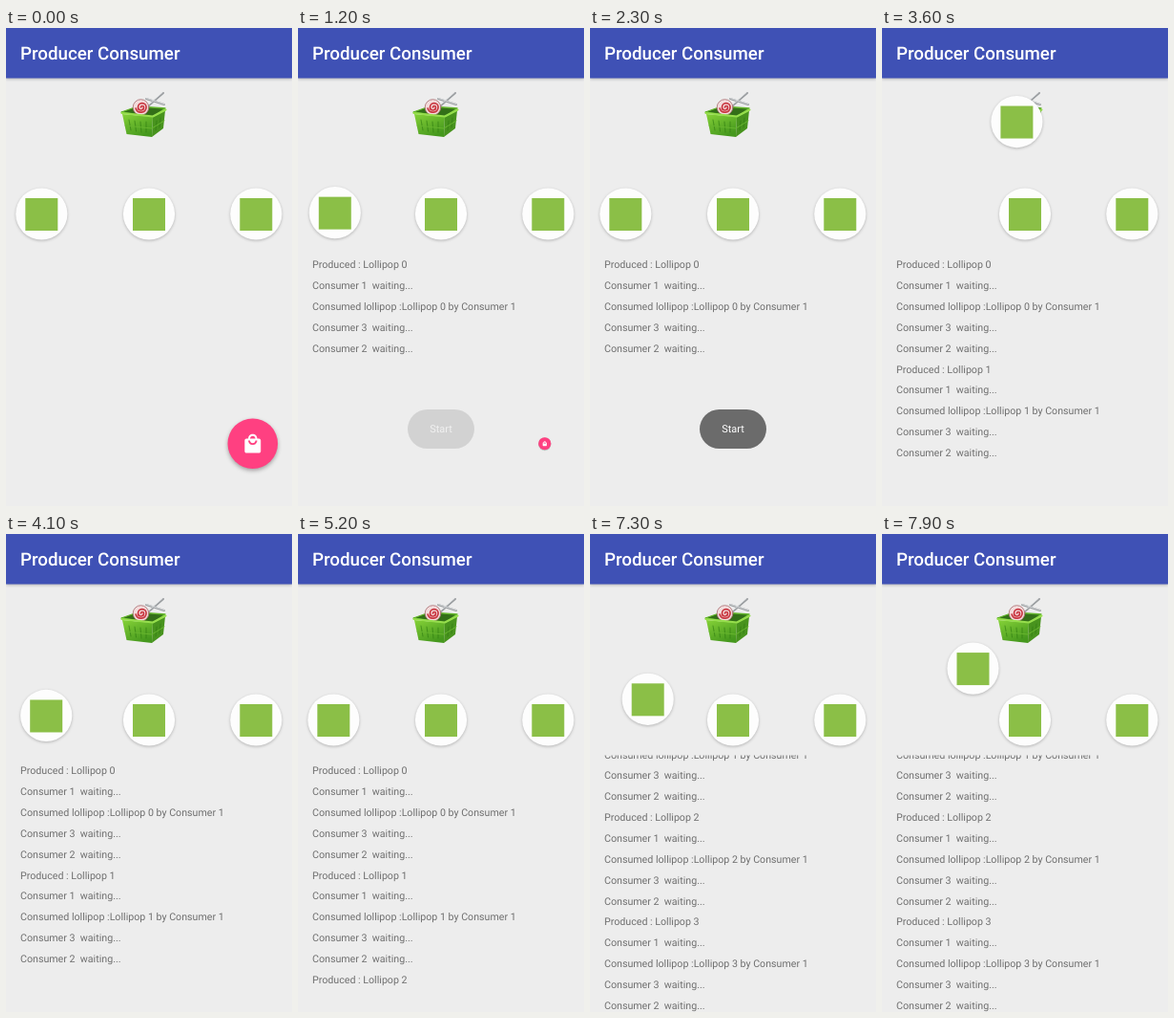
An HTML page for the animation above (8000 ms loop, 300 px wide and 500 px high).

```html
<!DOCTYPE html>
<html lang="en">
<head>
<meta charset="utf-8">
<title>Producer Consumer</title>
<style>
  html, body { margin: 0; width: 100%; height: 100%; overflow: hidden; background: #ededed; }
  svg { display: block; width: 100vw; height: 100vh; }
  text { font: 10.67px Roboto, sans-serif; fill: #6f6f6f; white-space: pre; text-rendering: geometricPrecision; }
  .title { font-size: 18.75px; font-weight: 500; fill: #fff; }
  .toast text { font-size: 10.9px; fill: #fff; text-anchor: middle; }
  .raised { filter: drop-shadow(0 1.5px 1.5px rgba(0, 0, 0, .24)); }
  .floating { filter: drop-shadow(0 2.5px 2.2px rgba(0, 0, 0, .32)); }
</style>
</head>
<body>
<svg viewBox="0 0 300 500">
  <defs>
    <g id="consumer" class="raised">
      <circle r="27.1" fill="#fdfdfd"/>
      <rect x="-17" y="-16.5" width="34" height="34" fill="#8bbf47"/>
    </g>
    <clipPath id="view"><rect y="231.5" width="300" height="268.5"/></clipPath>
    <linearGradient id="front" x2=".6" y2="1">
      <stop stop-color="#86d238"/><stop offset="1" stop-color="#45981d"/>
    </linearGradient>
  </defs>
  <rect width="300" height="500" fill="#ededed"/>
  <rect class="raised" width="300" height="52.5" fill="#3f51b5"/>
  <text class="title" x="15" y="33.4">Producer Consumer</text>

  <g id="basket" stroke-linecap="round" stroke-linejoin="round" fill="none">
    <path d="M121 88L138 82L167 84L154 93Z" fill="#336f18" stroke="#62b52a" stroke-width="1.3"/>
    <path d="M147 74L166 80M150 81L165 68" stroke="#9a9da0" stroke-width="2"/>
    <path d="M147 73.5L166 79.5M150 80L164 67.5" stroke="#e4e6e8" stroke-width=".8"/>
    <circle cx="141.5" cy="83" r="8.3" fill="#f3dcdc" stroke="#a86a6e" stroke-width=".8"/>
    <path d="M141.5 83a1.5 1.5 0 0 1 3 0a3 3 0 0 1 -6 0a4.3 4.3 0 0 1 8.6 0a5.6 5.6 0 0 1 -11 1" stroke="#c93640" stroke-width="1.7"/>
    <path d="M122 90L154 93L153 114L126.5 111Z" fill="url(#front)"/>
    <path d="M154 93L167 86L165 105L153 114Z" fill="#48931e"/>
    <path d="M121.5 89L154 92.5L167.5 85.5" stroke="#96de4c" stroke-width="2"/>
    <path d="M129 96L131 107M135 97L136.5 108M141 98L142 109M147 98L147 109M158 97L157 107M162 94L161 104" stroke="#2f7c12" stroke-opacity=".6" stroke-width="1.1"/>
    <path d="M125 102L153 105L166 97" stroke="#67b52e"/>
  </g>

  <use href="#consumer" x="150" y="194.5"/>
  <use href="#consumer" x="262.3" y="194.5"/>
  <use href="#consumer" id="mover"/>

  <g clip-path="url(#view)"><g id="log"></g></g>

  <g id="fab">
    <circle class="floating" r="26.3" fill="#ff4081"/>
    <path transform="translate(-11.25 -10.8) scale(.9375)" fill="#fff" d="M19 6h-2c0-2.76-2.24-5-5-5S7 3.24 7 6H5c-1.1 0-2 .9-2 2v12c0 1.1.9 2 2 2h14c1.1 0 2-.9 2-2V8c0-1.1-.9-2-2-2zm-7-3c1.66 0 3 1.34 3 3H9c0-1.66 1.34-3 3-3zm0 10c-2.76 0-5-2.24-5-5h2c0 1.66 1.34 3 3 3s3-1.34 3-3h2c0 2.76-2.24 5-5 5z"/>
  </g>
  <g id="toast" class="toast">
    <rect x="115" y="399" width="70" height="41" rx="20.5" fill="#6b6b6b"/>
    <text x="150" y="423">Start</text>
  </g>
</svg>
<script>
const LOOP = 8000, STEP = 100, PITCH = 21.85, FIRST = 251.3, LAST = 496.8;
// One trip per lollipop: departure, one-way time, "produced" line, remaining lines
const trips = [
  { start: 1160, half: 540, produced: 1200, rest: 1200 },
  { start: 3168, half: 500, produced: 3200, rest: 3200 },
  { start: 5246, half: 500, produced: 5200, rest: 5300 },
  { start: 7143, half: 512, produced: 7300, rest: 7300 }
];
const $ = id => document.getElementById(id);
const clamp = v => Math.max(0, Math.min(1, v));

const lines = trips.flatMap((trip, i) => [
  `Produced : Lollipop ${i}`,
  'Consumer 1  waiting...',
  `Consumed lollipop :Lollipop ${i} by Consumer 1`,
  'Consumer 3  waiting...',
  'Consumer 2  waiting...'
]).map((words, i) => {
  const line = document.createElementNS('http://www.w3.org/2000/svg', 'text');
  line.textContent = words;
  line.setAttribute('x', 15);
  line.setAttribute('y', FIRST + i * PITCH);
  return $('log').appendChild(line);
});

function reach(t) {
  const trip = trips.find(p => t >= Math.max(p.start, p.rest) && t < p.start + 2 * p.half);
  return trip ? (1 - Math.cos(Math.PI * (t - trip.start) / trip.half)) / 2 : 0;
}

function draw(t) {
  const k = reach(t);
  $('mover').setAttribute('transform', `translate(${37.3 + 109 * k} ${194.5 - 101 * k})`);

  const count = trips.reduce((n, p) => n + (t >= p.produced) + 4 * (t >= p.rest), 0);
  lines.forEach((line, i) => line.style.display = i < count ? '' : 'none');
  const scroll = Math.max(0, FIRST + (count - 1) * PITCH - LAST);
  $('log').setAttribute('transform', `translate(0 ${-scroll})`);

  $('fab').setAttribute('transform', `translate(258.8 434.7) scale(${clamp((1250 - t) / 200)})`);
  $('toast').style.opacity = Math.min(clamp((t - 1150) / 250), clamp((3400 - t) / 300));
}

function tick() {
  const now = performance.now() + 12;
  draw(Math.floor(now % LOOP / STEP) * STEP);
  requestAnimationFrame(tick);
}
tick();
</script>
</body>
</html>
```
